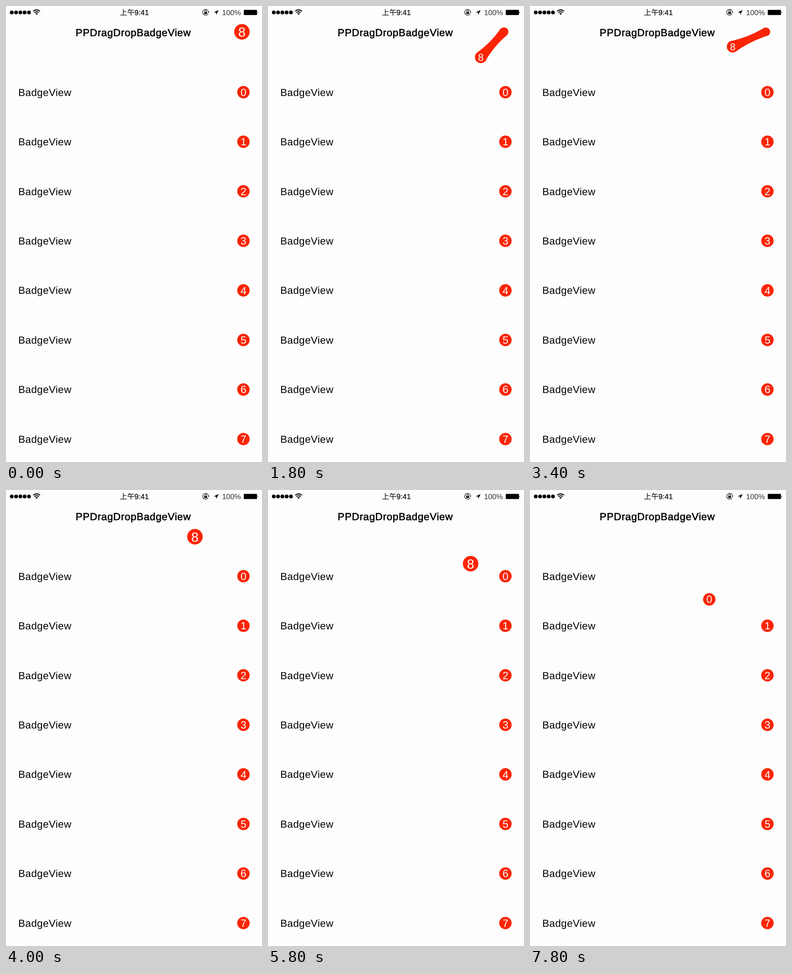
An HTML page for the animation above (8000 ms loop, 561 px wide and 998 px high).

```html
<!DOCTYPE html>
<html lang="zh">
<head>
<meta charset="utf-8">
<title>Badge drag</title>
<style>
html, body { margin: 0; width: 100%; height: 100%; overflow: hidden; background: #fdfdfd; }
svg { display: block; width: 561px; height: 998px; }
text {
  font-family: "Liberation Sans", "Noto Sans CJK SC", "Noto Sans CJK", sans-serif;
  font-size: 22.4px;
  letter-spacing: .4px;
  text-rendering: geometricPrecision;
}
.title { letter-spacing: .68px; stroke: #000; stroke-width: .65px; }
.status { font-size: 16.2px; letter-spacing: 0; }
.badge { fill: #fa2504; }
.badge text { fill: #fff; text-anchor: middle; letter-spacing: 0; }
.line { fill: none; stroke: #000; }
</style>
</head>
<body>
<svg id="stage" viewBox="0 0 561 998">
  <line class="line" x1="12.7" x2="51" y1="14.2" y2="14.2" stroke-width="8.2" stroke-linecap="round" stroke-dasharray="0 9.4"/>
  <path class="line" stroke-width="2" d="M59.5 11.6Q67 5.2 74.5 11.6M62.2 14.6Q67 10.4 71.8 14.6"/>
  <path d="M64.2 16.7Q67 14.5 69.8 16.7L67 19.6Z"/>
  <text class="status" x="249.5" y="20">上午</text>
  <text class="status" x="281.5" y="20" stroke="#000" stroke-width=".2">9:41</text>
  <g class="line" stroke-width="1.1">
    <path d="M443 17A6.4 6.4 0 1 1 443.8 13.2"/>
    <path d="M435.6 13.4V11.8a1.9 1.9 0 0 1 3.8 0V13.4"/>
  </g>
  <path d="M434.4 13.2h6.2v4.4h-6.2zM442.2 13h3.2l-1.6 2.5z"/>
  <path d="M465.8 8.8L461 19.2L460.3 14.4L455.3 13.9Z"/>
  <text class="status" x="473.6" y="20" fill="#333">100%</text>
  <rect x="521" y="8.6" width="29" height="11.2" rx="1.4"/>
  <path d="M551 12.2q2.2 2 0 4z"/>
  <text class="title" x="152.6" y="65.5">PPDragDropBadgeView</text>
</svg>
<script>
const LOOP = 8000, STEP = 200;
const TEAR = 90; // distance at which a badge comes off its neck
const stage = document.getElementById("stage");

function add(parent, tag, attrs, text = "") {
  const el = document.createElementNS("http://www.w3.org/2000/svg", tag);
  for (const key in attrs) el.setAttribute(key, attrs[key]);
  el.textContent = text;
  parent.append(el);
  return el;
}

function makeBadge(label, x, y, r) {
  const g = add(stage, "g", { class: "badge" });
  const neck = add(g, "path", {});
  const tail = add(g, "circle", { cx: x, cy: y });
  const head = add(g, "g", { transform: `translate(${x} ${y})` });
  const size = r * 1.69;
  add(head, "circle", { r });
  add(head, "text", { y: size * .355, style: `font-size:${size}px` }, label);
  return { g, neck, tail, head, x, y, r };
}

const rows = Array.from({ length: 8 }, (_, i) => {
  const y = 188.6 + i * 108.45;
  add(stage, "text", { x: 27, y: y + 8 }, "BadgeView");
  return makeBadge(i, 520.3, y, 13.6);
});
const total = makeBadge(8, 517, 56.5, 17);

// Each drag pulls a badge to its offset at peak, then springs back or drops it.
const drags = [
  { badge: total, start: 0, peak: 1800, end: 2800, dx: -50.5, dy: 55.5 },
  { badge: total, start: 2800, peak: 4000, end: 4800, dx: -103, dy: 45.8 },
  { badge: total, start: 5000, peak: 5800, end: 6200, dx: -73, dy: 104.8, drop: true },
  { badge: rows[0], start: 7000, peak: 7800, end: LOOP, dx: -127.5, dy: 50.7, drop: true }
];

function place(b, dx, dy, loose) {
  const d = Math.hypot(dx, dy);
  const stretched = !loose && d > .5;
  const pull = stretched ? d / 75 : 0;
  const scale = 1 - .23 * pull;
  const x = b.x + dx, y = b.y + dy;
  b.head.setAttribute("transform", `translate(${x} ${y}) scale(${scale})`);

  const tailR = stretched ? b.r * (1 - .42 * pull) : 0;
  b.tail.setAttribute("r", tailR);
  if (!stretched) return b.neck.setAttribute("d", "");

  const headR = b.r * scale, waist = tailR * (1 - .5 * pull);
  const at = (k, r) => `${b.x + dx * k - dy / d * r} ${b.y + dy * k + dx / d * r}`;
  b.neck.setAttribute("d",
    `M${at(0, tailR)}Q${at(.5, waist)} ${at(1, headR)}` +
    `L${at(1, -headR)}Q${at(.5, -waist)} ${at(0, -tailR)}Z`);
}

function drag({ badge, start, peak, end, dx, dy, drop }, t) {
  const rise = Math.sin(Math.PI / 2 * Math.min(1, (t - start) / (peak - start)));
  const fall = drop || t < peak ? 1 : Math.cos(Math.PI / 2 * (t - peak) / (end - peak));
  const reach = rise * fall;
  place(badge, dx * reach, dy * reach, rise * Math.hypot(dx, dy) > TEAR);
}

function draw(now) {
  const t = Math.floor(now % LOOP / STEP) * STEP;
  for (const { badge, drop, end } of drags) {
    place(badge, 0, 0, true);
    if (drop) badge.g.setAttribute("visibility", t < end ? "visible" : "hidden");
  }
  const active = drags.find(d => t >= d.start && t < d.end);
  if (active) drag(active, t);
}

const begin = performance.now();
function tick() {
  draw(performance.now() - begin);
  requestAnimationFrame(tick);
}
tick();
</script>
</body>
</html>
```
